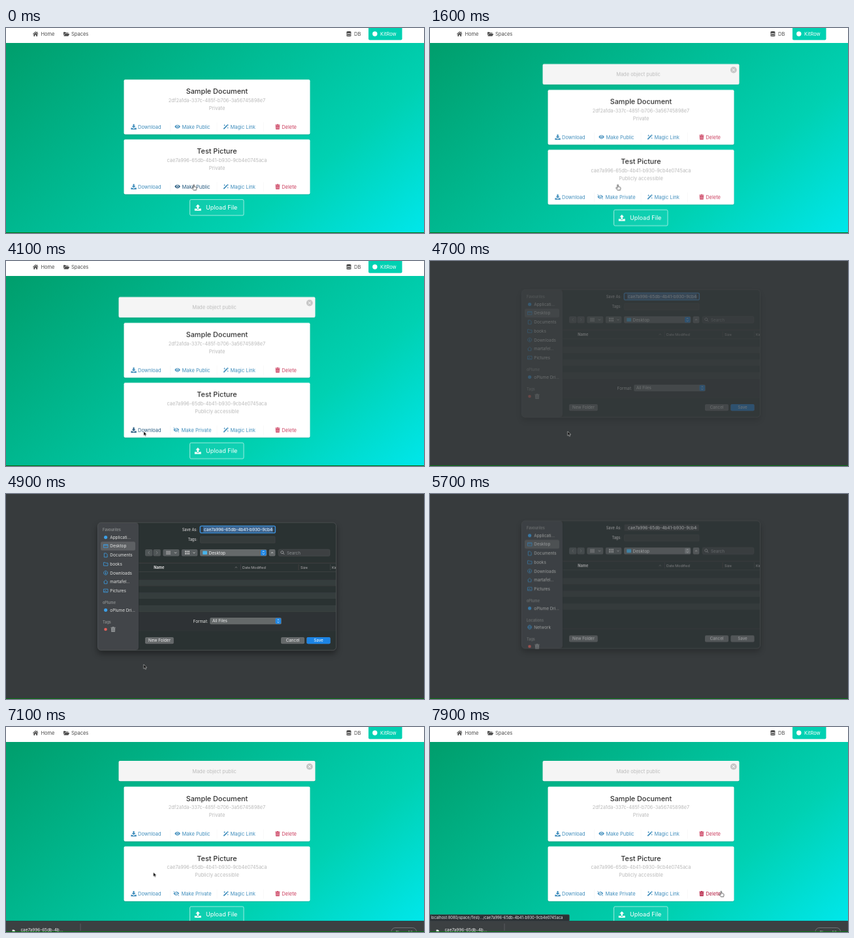
Write an HTML page that moves like this. It is 640 px wide and 315 px high and loops after 8000 ms.

```html
<!DOCTYPE html>
<html lang="en">
<head>
<meta charset="utf-8">
<title>File space</title>
<style>
html, body { margin: 0; width: 100%; height: 100%; overflow: hidden; background: #fff; }
#stage { position: relative; width: 640px; height: 315px; overflow: hidden; }
svg { position: absolute; left: 0; top: 0; }
text { font-family: Inter, "Liberation Sans", sans-serif; white-space: pre; }

#hero {
  position: absolute; left: 0; top: 22.5px; width: 640px; height: 292.5px;
  background: linear-gradient(141deg, #009e6c 0%, #00d1b2 71%, #00e7eb 100%);
  animation: hero 8s linear infinite;
}
@keyframes hero { 0%, 74.5% { height: 292.5px } 76.5%, 100% { height: 276px } }

#content { animation: content 8s linear infinite; }
@keyframes content {
  0%, 18.74% { transform: none }
  18.75%, 74.5% { transform: translateY(15.8px) }
  76.5%, 100% { transform: translateY(12.3px) }
}

/* Hard switches */
.before { animation: before 8s step-end infinite; }
.after { animation: after 8s step-end infinite; }
@keyframes before { 0% { opacity: 1 } 18.75%, 100% { opacity: 0 } }
@keyframes after { 0% { opacity: 0 } 18.75%, 100% { opacity: 1 } }

.link { color: #3f8dbc; }
.danger { color: #cb3f5f; }
.hover-public { animation: hover-public 8s step-end infinite; }
.hover-download { animation: hover-download 8s step-end infinite; }
.hover-delete { animation: hover-delete 8s step-end infinite; }
@keyframes hover-public { 0%, 100% { color: #24597f } 18.75% { color: #3f8dbc } }
@keyframes hover-download { 0%, 100% { color: #3f8dbc } 41% { color: #24597f } 79% { color: #3f8dbc } }
@keyframes hover-delete { 0% { color: #cb3f5f } 95.5%, 100% { color: #b3173c } }

#blank { animation: blank 8s step-end infinite; }
@keyframes blank { 0% { opacity: 0 } 52.5% { opacity: 1 } 74.5%, 100% { opacity: 0 } }

#dialog { animation: dialog 8s linear infinite; }
@keyframes dialog {
  0%, 58% { opacity: 0; transform: none }
  60.5%, 69.9% { opacity: 1; transform: none }
  70% { opacity: 1; transform: translateY(-2.8px) }
  73.2%, 100% { opacity: 0; transform: translateY(-2.8px) }
}
.active { animation: active 8s step-end infinite; }
.late { animation: late 8s step-end infinite; }
#tags { animation: tags 8s step-end infinite; }
@keyframes active { 0% { opacity: 1 } 70%, 100% { opacity: 0 } }
@keyframes late { 0% { opacity: 0 } 66%, 100% { opacity: 1 } }
@keyframes tags { 0% { transform: none } 66%, 100% { transform: translateY(29px) } }

#shelf { animation: shelf 8s linear infinite; }
@keyframes shelf { 0%, 74.5% { transform: translateY(17px) } 76.5%, 100% { transform: none } }
#split { animation: split 8s linear infinite; }
@keyframes split { 0%, 77.5% { transform: none } 81.25%, 100% { transform: translateX(59px) } }
#item { animation: item 8s linear infinite; }
@keyframes item { 0%, 81% { opacity: 0 } 83%, 100% { opacity: 1 } }
#badge { animation: badge 8s linear infinite; }
@keyframes badge {
  0%, 75% { opacity: 0; transform: translateY(-30px) }
  76% { opacity: 1 }
  77.5%, 78% { opacity: 1; transform: none }
  80.5%, 100% { opacity: 0; transform: none }
}
#status { animation: status 8s linear infinite; }
@keyframes status { 0%, 96% { opacity: 0 } 97.5%, 100% { opacity: 1 } }

#cursor { animation: cursor 8s ease-in-out infinite, typing 8s step-end infinite; }
@keyframes cursor {
  0%, 32.5% { transform: translate(287.6px, 240.6px) }
  42.5%, 75% { transform: translate(210.8px, 261.8px) }
  77.5% { transform: translate(212.8px, 226.8px) }
  81.25%, 87.5% { transform: translate(216px, 222px) }
  96.25%, 100% { transform: translate(445.8px, 252.3px) }
}
@keyframes typing { 0%, 100% { visibility: visible } 69.5% { visibility: hidden } 75% { visibility: visible } }
#hand { animation: hand 8s step-end infinite; }
#arrow { animation: arrow 8s step-end infinite; }
@keyframes hand { 0%, 100% { opacity: 1 } 33% { opacity: 0 } 41% { opacity: 1 } 50% { opacity: 0 } 95.5% { opacity: 1 } }
@keyframes arrow { 0%, 100% { opacity: 0 } 33% { opacity: 1 } 41% { opacity: 0 } 50% { opacity: 1 } 95.5% { opacity: 0 } }
</style>
</head>
<body>
<div id="stage"><div id="hero"></div></div>
<script>
const text = (x, y, size, str, fill, more = '') =>
  `<text x="${x}" y="${y}" font-size="${size}" fill="${fill}" ${more}>${str}</text>`;
const mid = (x, y, size, str, fill, more = '') =>
  text(x, y, size, str, fill, 'text-anchor="middle" ' + more);
const rect = (x, y, w, h, fill, r = 0, more = '') =>
  `<rect x="${x}" y="${y}" width="${w}" height="${h}" rx="${r}" fill="${fill}" ${more}/>`;
const line = (d, color, width, more = '') =>
  `<path d="${d}" fill="none" stroke="${color}" stroke-width="${width}" ${more}/>`;
const solid = (d, fill = 'currentColor') => `<path d="${d}" fill="${fill}" fill-rule="evenodd"/>`;
const at = (x, y, body, scale = 1) => `<g transform="translate(${x} ${y}) scale(${scale})">${body}</g>`;
const group = (cls, ...parts) => `<g class="${cls}">${parts.join('')}</g>`;

const eye = solid('M0 4C2 0 7 0 9 4 7 8 2 8 0 4zM4.5 1.9a2.1 2.1 0 1 0 .01 0zM4.5 2.8a1.2 1.2 0 1 1-.01 0z');
const tray = 'M0 6h2.2l2.3 1.6L6.8 6H9v2.8H0z';
const icon = {
  download: solid('M3.4 0h2.2v3.2h2L4.5 6.4 1.4 3.2h2z' + tray),
  upload: solid('M3.4 6.4h2.2V3.2h2L4.5 0 1.4 3.2h2z' + tray),
  eye,
  slash: eye + line('M.4 .4L9.2 7.8', '#fff', 2) + line('M0 .4L9 7.8', 'currentColor', .9),
  wand: line('M.6 7.8L6.6 1.8', 'currentColor', 1.9) +
    solid('M2 0l.5 1.2 1.2.5-1.2.5L2 3.4l-.5-1.2L.3 1.7l1.2-.5zM7.4 4.4l.4 1 1 .4-1 .4-.4 1-.4-1-1-.4 1-.4zM7 0l1.6 1.5-.8.8L6.2.7z'),
  trash: solid('M0 .8h2.2L2.8 0h2l.6.8h2.2v1H0zM.5 2.3h6.6l-.4 6.2H.9zM2.2 3.3v4.2h.5V3.3zM3.6 3.3v4.2h.5V3.3zM5 3.3v4.2h.5V3.3z'),
  home: solid('M0 4.2L4.4.2 6.4 2V.8h1.1V3l1.3 1.2-.6.7L4.4 1.6.6 4.9zM1.4 5l3-2.6 3 2.6v3.1H5.3V5.6H3.5v2.5H1.4z'),
  folder: solid('M0 .6h3l1 1h3.6v1.2H2L0 6.2zM2.3 3.4h7L7.4 7H.4z'),
  db: solid('M0 1.3C0-.4 7.6-.4 7.6 1.3v1C7.6 3.6 0 3.6 0 2.3zM0 3.4c1.5 1 6.1 1 7.6 0v1.5c0 1.4-7.6 1.4-7.6 0zM0 6c1.5 1 6.1 1 7.6 0v1.3c0 1.6-7.6 1.6-7.6 0z'),
};

const action = (cls, glyph, gx, x, label) =>
  group(cls, at(gx, 68.6, icon[glyph], .94), text(x, 75.4, 7.5, label, 'currentColor'));

function card(y, title, id, hover, state, toggle) {
  return at(180.5, y,
    rect(0, .6, 285, 84.6, '#0a5a55', 2, 'opacity=".25"') +
    rect(0, 0, 285, 84.3, '#fff', 2) +
    line('M71.3 66v14M142.5 66v14M213.8 66v14', '#f1f1f1', .5) +
    mid(142.5, 22.2, 10.8, title, '#303030', 'font-weight="550"') +
    mid(142.5, 34.4, 7.35, id, '#b9b9b9') +
    state + toggle +
    action(hover ? 'link hover-download' : 'link', 'download', 10.8, 21.6, 'Download') +
    action('link', 'wand', 152.2, 163, 'Magic Link') +
    action(hover ? 'danger hover-delete' : 'danger', 'trash', 231.8, 241.7, 'Delete'));
}
const access = label => mid(142.5, 46.5, 7.5, label, '#b9b9b9');
const makePublic = cls => action(cls, 'eye', 77.8, 89, 'Make Public');

const nav = rect(0, 0, 640, 22.5, '#fff') +
  group('" color="#4a4a4a',
    at(41, 5, icon.home, .96), text(53.4, 11.8, 7.5, 'Home', '#4a4a4a'),
    at(88, 5.6, icon.folder), text(100, 11.8, 7.5, 'Spaces', '#4a4a4a'),
    at(521.3, 5, icon.db, .95), text(533, 11.8, 7.5, 'DB', '#4a4a4a')) +
  rect(555, -4, 51.5, 22.4, '#00d1b2', 2) +
  '<circle cx="564.8" cy="9" r="3.7" fill="#fff"/>' +
  text(573, 11.8, 7.5, 'KitRow', '#fff');

const notice = group('after',
  rect(172.5, 39.8, 301, 31.8, '#0a5a55', 2, 'opacity=".2"'),
  rect(172.5, 39.6, 301, 31.4, '#f5f5f5', 2),
  mid(319, 58.3, 7.5, 'Made object public', '#bdbdbd'),
  '<circle cx="464.8" cy="48.6" r="4.9" fill="#c5c5c5"/>',
  line('M462.8 46.6l4 4m0-4l-4 4', '#fff', 1));

const content = `<g id="content">${notice}` +
  card(79.2, 'Sample Document', '2df2a1da-337c-485f-b706-3a56745898e7', false,
    access('Private'), makePublic('link')) +
  card(171.2, 'Test Picture', 'cae7a996-65db-4b41-b930-9cb4e0745aca', true,
    group('before', access('Private')) + group('after', access('Publicly accessible')),
    group('before', makePublic('link hover-public')) +
    group('after', action('link', 'slash', 76, 88, 'Make Private'))) +
  rect(281.5, 263.6, 82.5, 24.4, '#fff', 2, 'fill-opacity=".06" stroke="#fff" stroke-opacity=".75" stroke-width=".8"') +
  group('" color="#fff', at(288.8, 271, icon.upload, 1.1)) +
  text(306, 279.2, 9.1, 'Upload File', '#fff') + '</g>';

/* Save sheet */
const pale = '#e2e3e3', dim = '#8b8e90', blue = '#3d9fe6', accent = '#1a84e4';
const side = (y, label, glyph) => at(149, y, glyph + text(10.3, 2.3, 6.4, label, pale));
const head = (y, label) => text(148, y + 2, 5.5, label, dim, 'font-weight="600"');
const dot = '<circle cx="3.6" cy="0" r="2.6" fill="' + blue + '"/>';
const outline = d => line(d, blue, .8);
const box = outline('M.4-2.4h6.6v4.8H.4z');
const steps = (x, y) => rect(x, y, 8.4, 8.6, '#85898b', 1.6) +
  group('active', rect(x, y, 8.4, 8.6, accent, 1.6)) +
  line(`M${x + 2.7} ${y + 3.4}l1.5-1.5 1.5 1.5m0 1.9l-1.5 1.5-1.5-1.5`, '#fff', .8);
const chevron = (x, y) => line(`M${x} ${y}l1.5 1.6 1.5-1.6`, '#d5d5d5', .8);
const button = (x, w, label) => rect(x, 220, w, 10.2, '#65696b', 2) + mid(x + w / 2, 227.3, 6.3, label, '#f0f0f0');

const sidebar = rect(140.5, 44, 62.8, 196, '#424548', 5) + rect(145, 73.2, 53, 13.6, '#5d6063', 2.5) +
  head(55, 'Favourites') +
  side(66.6, 'Applicati...', dot) +
  side(80, 'Desktop', box + outline('M.4-1h6.6')) +
  side(94, 'Documents', outline('M1.3-3h3l1.8 1.8v4.2H1.3z')) +
  side(107.6, 'books', outline('M.4-2.4h2.4l.8.9H7v4H.4z')) +
  side(121.2, 'Downloads', outline('M3.6-3a3 3 0 1 0 .01 0zM3.6-1.6v3M2.3.2l1.3 1.3L4.9.2')) +
  side(135, 'martafel...', outline('M.3.2l3.3-3 3.3 3M1.3-.2v3h4.6v-3')) +
  side(148.6, 'Pictures', box + outline('M1 1.9l2-2.2L5.4 2')) +
  head(167.4, 'oPlume') + side(178.3, 'oPlume Dri...', dot) +
  group('late', head(196.8, 'Locations'),
    side(207.4, 'Network', outline('M3.6-3a3 3 0 1 0 .01 0zM.6 0h6M3.6-3c-2 2-2 4 0 6 2-2 2-4 0-6'))) +
  `<g id="tags">${head(196.6, 'Tags')}<circle cx="152.5" cy="208" r="2.3" fill="#e0605a"/>` +
  group('" color="#9a9d9f', at(160.4, 204, icon.trash, .95)) + '</g>';

const toolbar = rect(213, 85, 11.4, 10.4, '#505456', 2) + rect(225.4, 85, 11.4, 10.4, '#505456', 2) +
  line('M219.8 88l-2 2.2 2 2.2M230 88l2 2.2-2 2.2', '#85888a', .8) +
  rect(240.3, 85, 25, 10.4, '#595d5f', 2) + rect(268.8, 85, 24.6, 10.4, '#595d5f', 2) +
  line('M245 88.2h7M245 90.2h7M245 92.2h7', '#c8c8c8', .8) + chevron(258, 89.5) +
  line('M274 88.4h7M274 91.6h7', '#c8c8c8', 2.2, 'stroke-dasharray="1.8 .8"') + chevron(286.4, 89.5) +
  rect(297, 85, 102.4, 10.4, '#65696b', 2) +
  rect(301.2, 87.6, 6.8, 5.4, '#48b2e8', .8) + text(310.6, 92.6, 6.5, 'Desktop', '#f0f0f0') + steps(390, 85.9) +
  rect(402.6, 85, 9.8, 10.4, '#65696b', 2) + line('M406 91l1.5-1.5 1.5 1.5', '#eee', .8) +
  rect(417, 85, 79, 10.4, '#3d4143', 2, 'stroke="#494d4f" stroke-width=".5"') +
  line('M423-0', 'none', 0) + line('M422.8 87.6a2 2 0 1 0 .01 0zM424.4 91l1.8 1.9', '#b5b7b8', .8) +
  text(430, 92.5, 6.3, 'Search', dim);

const table = line('M203.5 106.2H505.3M203.5 119.4H505.3', '#474b4d', .7) +
  line('M359.3 108v9M448 108v9M496.5 108v9', '#474b4d', .7) +
  text(226.3, 114.6, 5.6, 'Name', pale, 'font-weight="700"') +
  line('M350.6 113.6l1.7-1.6 1.7 1.6', dim, .7) +
  text(362, 114.6, 5.4, 'Date Modified', '#b5b7b8') + text(451, 114.6, 5.4, 'Size', '#b5b7b8') +
  `<svg width="505.3" height="315">${text(499, 114.6, 5.4, 'Kind', '#b5b7b8')}</svg>` +
  [131.7, 151.2, 170.8].map(y => rect(203.5, y, 301.8, 9.8, '#363c3d')).join('') +
  line('M203.5 209.8H505.3', '#414547', .6);

const sheet = `<g id="dialog" filter="url(#drop)">` +
  rect(140.5, 44, 365, 196, '#2b3031', 5) + sidebar + line('M203.4 44V240', '#232728', .6) +
  text(293, 56.7, 5.7, 'Save As:', pale, 'text-anchor="end"') + text(293, 72.3, 5.7, 'Tags:', pale, 'text-anchor="end"') +
  rect(297.5, 49.6, 114.5, 9.8, '#3c4042', 1) +
  group('active', rect(297.3, 49.2, 115, 10.6, '#2f3a44', 2, 'stroke="#3a8ad0" stroke-width="1.6"'), rect(302, 50.4, 106.5, 8.2, '#406b98')) +
  `<svg width="408.5" height="315">${text(303, 56.9, 6.5, 'cae7a996-65db-4b41-b930-9cb4e0745aca', '#f4f4f4')}</svg>` +
  rect(297.5, 65.4, 114.5, 9.8, '#353a3b', 1, 'stroke="#45494b" stroke-width=".6"') +
  toolbar + table +
  group('active', rect(203.5, 180.6, 301.8, 29, '#2e3334'), line('M203.5 180.6H505.3', '#474b4d', .6),
    text(309.6, 197.6, 6.4, 'Format:', pale, 'text-anchor="end"'),
    rect(312.2, 190, 109.6, 10.2, '#65696b', 2), text(316, 197.3, 6.3, 'All Files', '#f0f0f0'), steps(412.6, 190.8)) +
  button(213, 43.8, 'New Folder') + button(421, 36, 'Cancel') + button(460.4, 36.2, 'Save') +
  group('active', rect(460.4, 220, 36.2, 10.2, accent, 2), mid(478.5, 227.3, 6.3, 'Save', '#fff')) +
  rect(140.5, 44, 365, 196, 'none', 5, 'stroke="#5a5e60" stroke-width=".6"') + '</g>';

const shelf = '<g id="shelf">' + rect(0, 298, 640, 17, '#3c4042') + line('M0 298.2H640', '#2c3032', .6) +
  '<g id="split">' + line('M55 302V313', '#66696b', .7) + '</g>' +
  rect(590, 308.5, 38.5, 14, 'none', 6, 'stroke="#85888a" stroke-width=".7"') +
  mid(609.3, 317.6, 6.4, 'Show All', '#e8e8e8') +
  '<g id="item">' + solid('M9.6 311.4h2.6l1.6 1.6v5H9.6z', '#f0f0f0') + text(22.4, 313.8, 6.4, 'cae7a996-65db-4b...', '#f0f0f0') + '</g></g>';

const badge = '<g id="badge"><circle cx="16" cy="296" r="17.6" fill="#f1f2f3"/>' +
  solid('M14.5 288.5h3v6h3.4L16 300.2l-4.9-5.7h3.4z', '#4a8fd0') + rect(8.2, 305.4, 15.8, 2, '#4a8fd0') + '</g>';

const status = '<g id="status">' + rect(-2, 288.2, 215.4, 10, '#2b3034', 1.5, 'stroke="#4a5054" stroke-width=".5"') +
  text(1.4, 295.3, 5.78, 'localhost:8080/space/Test/.../cae7a996-65db-4b41-b930-9cb4e0745aca', '#eceded') + '</g>';

const cursor = '<g id="cursor"><g id="hand">' +
  '<path d="M-.8.7C-.8-.3.7-.3.7.7V3.4C1.3 2.9 2 3.1 2.1 3.7 2.6 3.3 3.3 3.6 3.3 4.3 4.2 4.1 4.3 4.8 4.2 5.6L3.6 8.6H-.4L-2.8 5.5C-3.3 4.7-2.3 4.2-1.6 4.8L-.8 5.6z" fill="#fff" stroke="#222" stroke-width=".7"/></g>' +
  '<g id="arrow"><path d="M0 0V6.6L1.5 5.2 2.5 7.6 3.7 7.1 2.7 4.8H4.8z" fill="#000" stroke="#fff" stroke-width=".5"/></g></g>';

document.getElementById('stage').insertAdjacentHTML('beforeend',
  `<svg width="640" height="315" viewBox="0 0 640 315">
    <defs><filter id="drop" x="-10%" y="-10%" width="120%" height="130%">
      <feDropShadow dx="0" dy="5" stdDeviation="5" flood-color="#000" flood-opacity=".4"/></filter></defs>
    ${nav}${content}
    <g id="blank">${rect(0, 0, 640, 315, '#373b3d')}${sheet}</g>
    ${shelf}${status}${badge}
    ${rect(0, 314, 640, 1, '#067012')}
    ${cursor}
  </svg>`);
</script>
</body>
</html>
```
